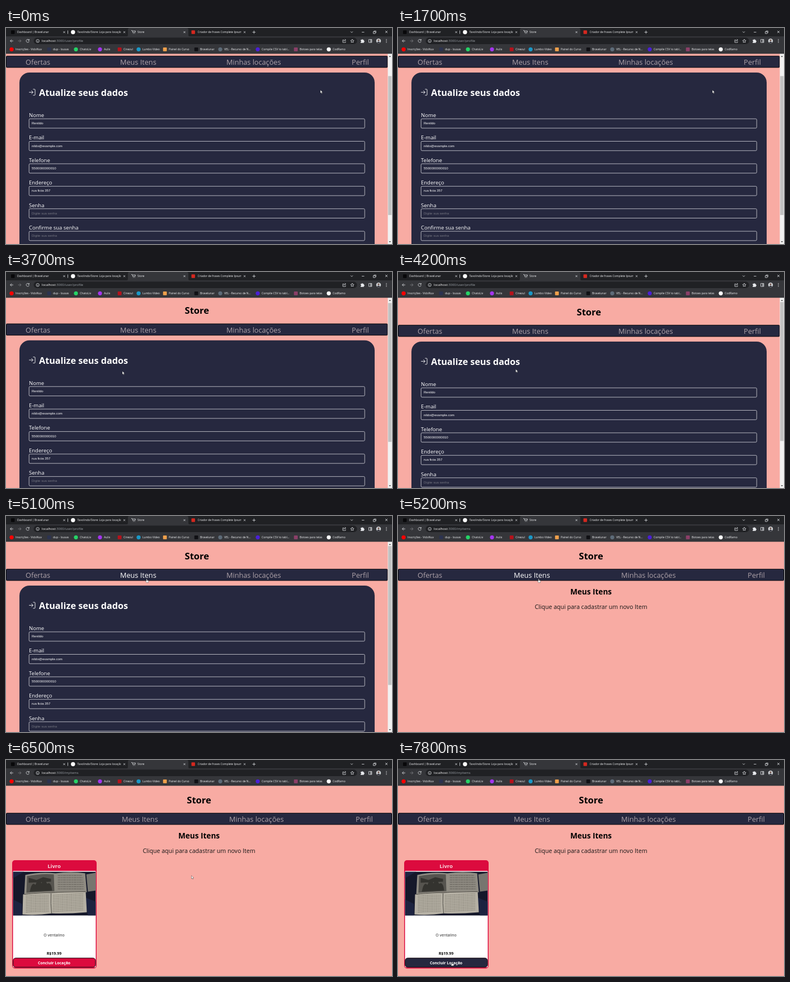
These frames come from a looping animation (690 px wide and 388 px high, 8 s). An HTML page:

```html
<!DOCTYPE html>
<html lang="pt-BR">
<head>
<meta charset="utf-8">
<title>Store</title>
<style>
  html, body { margin: 0; width: 100%; height: 100%; overflow: hidden; background: #f8aba3; }
  svg { font-family: "Open Sans", "Noto Sans", sans-serif; }
  #stage { display: block; width: 100%; height: 100%; }
  text { white-space: pre; }
  .b { font-weight: 700; }
  .mid { text-anchor: middle; }
  .field { font-family: "Liberation Sans", Arial, sans-serif; }
  .line { fill: none; stroke: #dfe1e5; stroke-width: .8; }
</style>
</head>
<body>
<svg id="stage" viewBox="0 0 690 388"></svg>
<script>
const LOOP = 8000, STEP = 100;
const SCROLL = 45, OPEN_ITEMS = 5200, SHOW_CARD = 5300;
const NAVY = '#26283f', RED = '#dc0b3e', PINK = '#f8aba3', BAR = '#35363a', DARK = '#202124', LINK = '#aea2a9';

const text = (x, y, size, str, fill = '#fff', cls = '') =>
  `<text x="${x}" y="${y}" font-size="${size}" fill="${fill}" class="${cls}">${str}</text>`;
const rect = (x, y, w, h, fill, rx = 0, more = '') =>
  `<rect x="${x}" y="${y}" width="${w}" height="${h}" fill="${fill}" rx="${rx}" ${more}/>`;
const dot = (x, y, r, fill) => `<circle cx="${x}" cy="${y}" r="${r}" fill="${fill}"/>`;
const path = (d, more = 'class="line"') => `<path d="${d}" ${more}/>`;
const cross = (x, y, r) => path(`M${x - r} ${y - r}l${2 * r} ${2 * r}m0 ${-2 * r}l${-2 * r} ${2 * r}`);

// Browser frame
const TABS = [
  ['Dashboard | Bravelunar', 8],
  ['Tavolindo/Store: Loja para locação', 115.5],
  ['Store', 223],
  ['Criador de frases Complete Ipsum', 330.5],
];
const BOOKMARKS = [
  ['Inscrições - VidoNuv', 17, '#f00', 1], ['dup - lousas', 84, '#2c3350', 0],
  ['ChatoLiv', 132, '#25d366', 1], ['Aulix', 175, '#a435f0', 1],
  ['Cinezul', 210, '#b5121b', 0], ['Lumbo Video', 244, '#1a98c7', 1],
  ['Painel do Curso', 291, '#f0a04b', 0], ['Bravelunar', 347, '#101014', 0],
  ['VEL - Recurso de N...', 390, '#5d6b78', 1], ['Compile CSV to tabl...', 457, '#4a1fd6', 1],
  ['Botoes para telas', 525, '#8c3f68', 0], ['CodRamo', 584, '#fff', 1],
];

function tabIcon(i, x) {
  if (i === 1) return dot(x + 4.3, 7.5, 3.7, '#fff');
  if (i === 2) return path(`M${x + 1} 4.5h1.6l1.3 4h3.6l1-3h-5M${x + 4} 10.4h.5m2.4 0h.5`, 'fill="none" stroke="#e8eaed" stroke-width=".8"');
  return rect(x + 1, 4.3, 6.4, 6.4, i ? '#d5281f' : '#08080a', 1);
}

function browser() {
  const tabs = TABS.map(([title, x], i) => tabIcon(i, x) +
    `<svg x="${x + 12}" y="0" width="78" height="15">${text(0, 9.2, 5, title, '#f4f5f7')}</svg>` +
    cross(x + 96, 7.5, 1.6)).join('');
  const marks = BOOKMARKS.map(([title, x, color, round]) =>
    (round ? dot(x - 7, 38.3, 3.6, color) : rect(x - 10.3, 35, 6.8, 6.8, color, 1)) +
    text(x, 40.2, 5, title, '#f4f5f7')).join('');
  return rect(0, 0, 690, 15, DARK) +
    path('M216 15q2 0 2-3V3q0-3 3-3h102q3 0 3 3v9q0 3 2 3z', `fill="${BAR}"`) +
    rect(0, 15, 690, 31.3, BAR) + rect(49.5, 17.3, 578, 11.8, DARK, 5.9) +
    tabs + path('M110.5 4.5v6M440.5 7.5h5.6m-2.8-2.8v5.6') +
    path('M616 6.3l2 2 2-2M636 7.5h4.4M656.5 6.5h3.5v3.5h-3.5zm1-1.2h3.8v3.8') + cross(680, 7, 2) +
    path('M13 23.2H7.6m2.6-2.6l-2.6 2.6 2.6 2.6') +
    path('M21.6 23.2H27m-2.6-2.6l2.6 2.6-2.6 2.6', 'fill="none" stroke="#7f8286" stroke-width=".8"') +
    path('M41 21.6a2.7 2.7 0 1 0 .4 2.2M41.4 20v2.2h-2.2') +
    path('M54 23.3a2.7 2.7 0 1 0 5.4 0a2.7 2.7 0 1 0-5.4 0m2.7-.3v1.8m0-3.2v.4') +
    `<text x="64" y="25.4" font-size="5.9" fill="#9aa0a6"><tspan fill="#fff">localhost</tspan>:3000/<tspan id="route"></tspan></text>` +
    path('M604 21.4h-2v4.6h5v-2M603.6 24q.4-2.4 3.6-2.4m-1.4-1.5l1.6 1.5-1.6 1.5') +
    path('M619 20.2l.9 1.9 2.1.3-1.5 1.5.4 2.1-1.9-1-1.9 1 .4-2.1-1.5-1.5 2.1-.3z') +
    path('M634 21.3h1.8a1.1 1.1 0 0 1 2.2 0h1.7v1.8a1.1 1.1 0 0 1 0 2.2v1.4H634v-1.6a1 1 0 0 0 0-2z', 'fill="#e8eaed"') +
    path('M648.5 20.6h5.4v5.4h-5.4zm3.4 0v5.4m.9-5.4v5.4') +
    dot(666, 23.3, 4.2, '#cfd3d6') + dot(666, 22, 1.6, '#6b4c42') +
    path('M663 26.2q3-4 6 0q-3 2.4-6 0z', 'fill="#3b3c45"') +
    [20.8, 23.3, 25.8].map(y => dot(680, y, .7, '#e8eaed')).join('') + marks;
}

// Shop pages
const LINKS = ['Ofertas', 'Meus Itens', 'Minhas locações', 'Perfil'];

function header(width, xs) {
  return text(width / 2, 77.6, 16.5, 'Store', '#000', 'b mid') +
    rect(.5, 95.4, width - 1, 20.5, NAVY, 1.5, 'stroke="#08080c" stroke-width="1"') +
    LINKS.map((s, i) => text(xs[i], 111, 12.7, s, LINK, i === 1 ? 'mine' : '')).join('');
}

const FIELDS = [
  ['Nome', 'Renildo'], ['E-mail', 'nildo@example.com'], ['Telefone', '5500000000010'],
  ['Endereço', 'rua ficta 357'], ['Senha'], ['Confirme sua senha'],
];

function profile() {
  const form = FIELDS.map(([label, value], i) => {
    const y = 40.4 * i;
    return text(41, 205 + y, 9.5, label) +
      rect(41.2, 208.1 + y, 600, 16.8, 'none', 1.8, 'stroke="#e4e4ea" stroke-width=".75"') +
      text(46, 218.2 + y, 6.05, value || 'Digite sua senha', value ? '#fff' : '#757680', 'field');
  }).join('');
  return `<g id="scroller">${header(682.5, [35, 204, 394, 618])}` +
    rect(24, 125, 635, 370, NAVY, 18) +
    path('M15 3h4a2 2 0 0 1 2 2v14a2 2 0 0 1-2 2h-4M10 17l5-5-5-5M15 12H3',
      'transform="translate(39.4 153.2) scale(.6)" fill="none" stroke="#fff" stroke-width="1.5"') +
    text(59, 167, 16.2, 'Atualize seus dados', '#fff', 'b') + form + '</g>' +
    rect(682.5, 46, 7.5, 342, '#f1f1f1') + rect(683.2, 54, 6, 249.5, '#c1c1c1', 0, 'id="thumb"') +
    path('M684.4 52l1.9-2.2 1.9 2.2zM684.4 383l1.9 2.2 1.9-2.2z', 'fill="#505050"');
}

function photo() {
  let rows = '';
  for (let i = 0; i < 11; i++) {
    const y = 44 + i * 2.9;
    rows += `M23 ${y}q20 -2.4 41 -1.4M71 ${y - 1.4}q28 -1.6 55 -3`;
  }
  return `<svg x="12.5" y="200.5" width="148" height="79">` +
    rect(0, 0, 148, 79, '#15182a') +
    path('M0 12L20 0H0zM0 50l16 8v21H0zM128 46l20 8v25h-14z', 'fill="#1d2340"') +
    path('M131 5l17-3v32l-14 2z', 'fill="#77756f"') +
    path('M22 6q26-6 54-3q28-4 53 0l3 34q-56 3-112 5z', 'fill="#8f8b82"') +
    path('M25 8q26-5 48-3l1 30-50 3z', 'fill="#56544f"') +
    path('M30 36q4-20 10-12q5-14 11-3q5-11 10 1q7-5 9 12zM28 11l14 4 12-5 14 3v5l-40 2z', 'fill="#34332f"') +
    path('M80 7h44m-44 4h45m-45 4h45m-45 4h46m-46 4h46m-46 4h46m-46 4h46', 'stroke="#6f6b63" stroke-width="1.3" stroke-dasharray="5 .8 3 .7"') +
    path('M18 41q28-5 50-2q30-4 62-3l2 37q-33 3-63 2q-26 4-52 2z', 'fill="#b5b0a4"') +
    path(rows, 'fill="none" stroke="#827d72" stroke-width=".9" stroke-dasharray="4 .7 2.5 .6"') +
    path('M68 39q-1 18 1 36M20 41q28-4 110-5', 'fill="none" stroke="#4b4842" stroke-width="1"') + '</svg>';
}

function items() {
  const card = rect(11, 180, 151, 194.5, RED, 5) + text(86, 194, 9.5, 'Livro', '#f6d5dc', 'b mid') +
    rect(12.5, 199.3, 148, 173, '#fff', 1) + photo() +
    text(86, 316.8, 7, 'O ventalino', '#222', 'mid') + text(86, 350.2, 7, 'R$19.99', '#111', 'b mid') +
    rect(12.8, 355.8, 147.2, 16.4, RED, 4.5, 'id="button" stroke="#16060c" stroke-width="1"') +
    text(86, 366.6, 6.9, 'Concluir Locação', '#fff', 'b mid');
  return header(690, [35, 207, 399, 625]) + text(345, 141.2, 13.6, 'Meus Itens', '#000', 'b mid') +
    text(345, 167, 10.6, 'Clique aqui para cadastrar um novo Item', '#151515', 'mid') + `<g id="card">${card}</g>`;
}

// Each pointer is drawn with its hot spot at 0,0
const POINTERS = {
  arrow: path('M0 0v5.6l1.3-1.2 1 2 .9-.4-.9-2h1.8z', 'fill="#fff" stroke="#222" stroke-width=".4"'),
  hand: path('M-.6 .3q.6-.9 1.2 0v2l2.3.6q.6.2.5.9l-.5 2.6H-.6L-2.2 4q.2-.9 1.6 0z', 'fill="#fff" stroke="#222" stroke-width=".4"'),
  beam: path('M-1-2.8h2M0-2.8v5.6M-1 2.8h2', 'stroke="#0b0b12" stroke-width=".7"'),
};

const stage = document.getElementById('stage');
stage.innerHTML = rect(0, 0, 690, 388, PINK) + `<g id="profile">${profile()}</g><g id="items">${items()}</g>` +
  browser() + '<g id="pointer">' +
  Object.entries(POINTERS).map(([kind, art]) => `<g id="${kind}">${art}</g>`).join('') + '</g>';

const $ = id => document.getElementById(id);
const show = (id, on) => $(id).setAttribute('visibility', on ? 'inherit' : 'hidden');
const mine = document.querySelectorAll('.mine');

// time, x, y of the pointer
const MOVES = [
  [0, 562, 111.5], [2300, 562, 111.5], [3200, 201, 172], [3500, 201, 172], [3700, 208, 178.3],
  [4100, 208, 178.3], [4800, 251.5, 113.2], [5700, 251.5, 113.2], [6500, 331.5, 207.7],
  [6700, 331.5, 207.7], [7500, 96.5, 363.3], [LOOP, 96.5, 363.3],
];
const clamp = v => Math.min(1, Math.max(0, v));

function pointerAt(t) {
  const i = MOVES.findIndex(m => m[0] > t);
  const [t0, x0, y0] = MOVES[i - 1], [t1, x1, y1] = MOVES[i];
  const p = (t - t0) / (t1 - t0), e = p * p * (3 - 2 * p);
  return [x0 + (x1 - x0) * e, y0 + (y1 - y0) * e];
}

function draw(t) {
  const [x, y] = pointerAt(t);
  const scroll = SCROLL * (1 - clamp((t - 3500) / 300)) ** 2.7;
  const onItems = t >= OPEN_ITEMS, hasCard = t >= SHOW_CARD;
  const over = (left, top, w, h) => x >= left && x <= left + w && y >= top && y <= top + h;
  const onLink = over(204, 97 - (onItems ? 0 : scroll), 68, 19);
  const onButton = hasCard && over(12, 355, 149, 18);
  const onField = !onItems && over(41, 208 - scroll, 600, 17);
  const kind = onLink || onButton ? 'hand' : onField ? 'beam' : 'arrow';

  show('profile', !onItems);
  show('items', onItems);
  show('card', onItems && hasCard);
  $('route').textContent = onItems ? 'myitems' : 'user/profile';
  $('scroller').setAttribute('transform', `translate(0 ${-scroll})`);
  $('thumb').setAttribute('y', 54 + scroll * .72);
  $('button').setAttribute('fill', onButton ? NAVY : RED);
  mine.forEach(link => link.setAttribute('fill', onLink ? '#fff' : LINK));
  $('pointer').setAttribute('transform', `translate(${x} ${y})`);
  Object.keys(POINTERS).forEach(k => show(k, k === kind));
}

const start = performance.now();
function tick() {
  const t = (performance.now() - start) % LOOP;
  draw(Math.floor(t / STEP) * STEP);
  requestAnimationFrame(tick);
}
tick();
</script>
</body>
</html>
```
